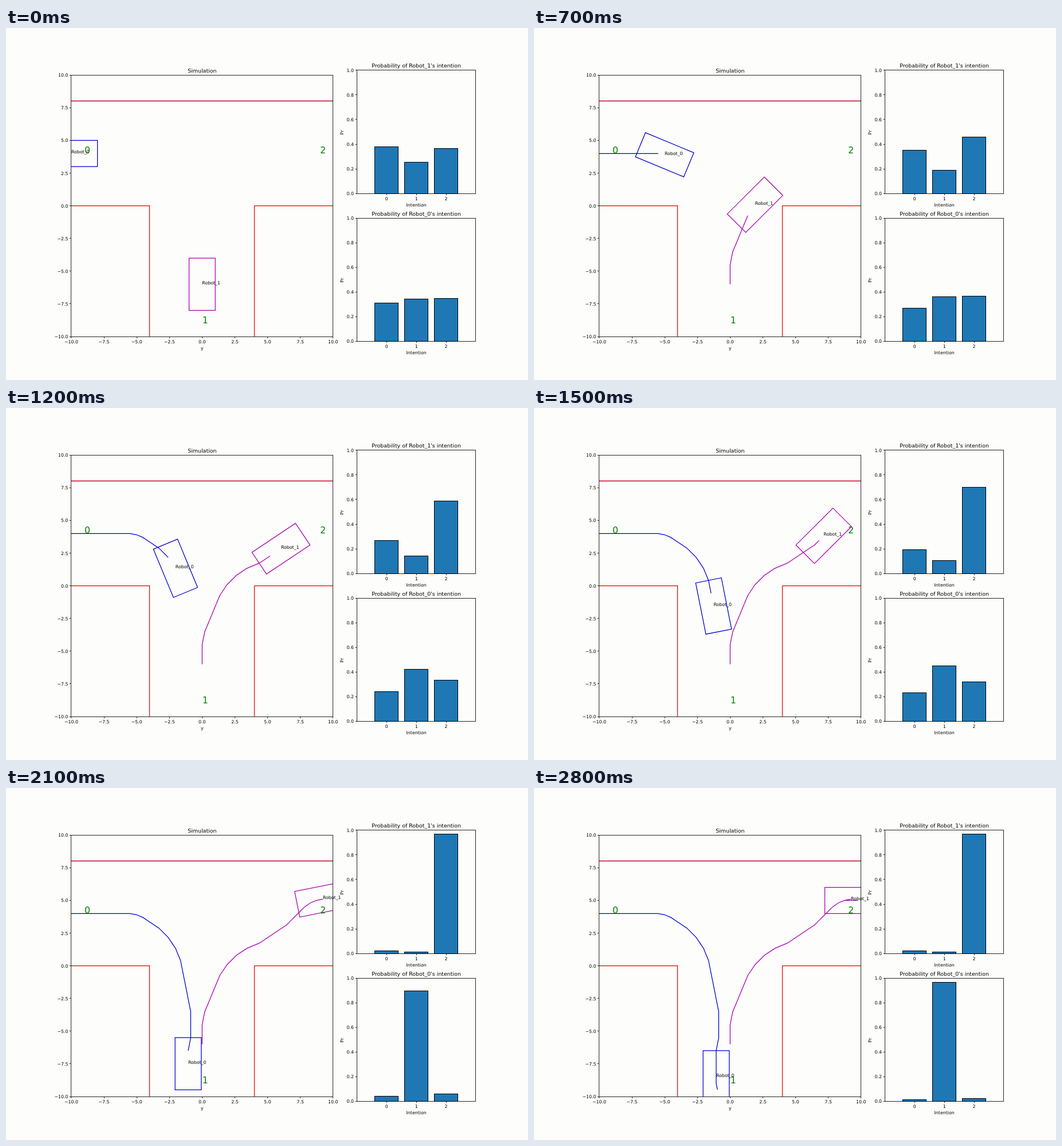
An HTML page that plays this animation: 911x615 px, repeating every 2900 ms.

```html
<!DOCTYPE html>
<html lang="en">
<head>
<meta charset="utf-8">
<title>Simulation</title>
<style>
  html, body { margin: 0; width: 100%; height: 100%; overflow: hidden; background: #fdfdfc; }
  svg { display: block; width: 911px; height: 615px; }
  text { font-family: "DejaVu Sans", sans-serif; font-size: 7.83px; fill: #000; }
  .title { font-size: 9.43px; }
  .goal { font-size: 15.67px; fill: #008000; }
  .axis { fill: none; stroke: #000; stroke-width: .85; }
  .wall, .trail, .body { fill: none; stroke-width: 1.25; }
  .wall { stroke: #ec0000; }
  .top { stroke: #d00028; stroke-width: 1.4; }
  .bar { fill: #1f77b4; stroke: #000; stroke-width: 1; }
</style>
</head>
<body>
<svg id="stage" viewBox="0 0 911 615"></svg>
<script>
const FRAME = 100, COUNT = 29, TURN = Math.PI / 16;
const stage = document.getElementById('stage');

function add(tag, attrs, parent = stage, content) {
  const el = document.createElementNS('http://www.w3.org/2000/svg', tag);
  for (const k in attrs) el.setAttribute(k, attrs[k]);
  if (content !== undefined) el.textContent = content;
  parent.appendChild(el);
  return el;
}
const label = (str, x, y, anchor = 'middle', cls = '') =>
  add('text', { x, y, 'text-anchor': anchor, class: cls }, stage, str);

// Main plot: data range -10..10 on both axes
const UNIT = 22.84, MID_X = 342.35, MID_Y = 310.65;
const px = x => MID_X + x * UNIT;
const py = y => MID_Y - y * UNIT;
const snap = v => Math.floor(v) + .5;
const trace = (pts, fit = v => v.toFixed(2)) => pts.length < 2 ? '' :
  'M' + pts.map(([x, y]) => fit(px(x)) + ' ' + fit(py(y))).join('L');

function box(x, y, w, h, cls) {
  const left = snap(x), top = snap(y);
  return add('rect', { x: left, y: top, width: snap(x + w) - left, height: snap(y + h) - top, class: cls });
}
function axes(x, y, w, h, title, xName) {
  box(x, y, w, h, 'axis');
  label(title, x + w / 2, y - 4.4, 'middle', 'title');
  label(xName, x + w / 2, y + h + 22.9);
}
function xTick(x, base, str) {
  add('path', { d: `M${snap(x)} ${snap(base)}v2.7`, class: 'axis' });
  label(str, x, base + 11.6);
}
function yTick(left, y, str) {
  add('path', { d: `M${snap(left)} ${snap(y)}h-2.7`, class: 'axis' });
  label(str, left - 5.4, y + 3, 'end');
}

// From each listed frame on, "aim" sets the course to turn to (sixteenths of a half turn,
// one per frame) and "pace" the distance per frame.
function drive({ start: [x, y], dir, aim, pace }) {
  const poses = [];
  let goal = dir, speed = 0;
  for (let n = 0; n <= COUNT; n++) {
    goal = aim[n] ?? goal;
    speed = pace[n] ?? speed;
    dir += Math.sign(goal - dir);
    const a = dir * TURN;
    if (n) poses[n - 1].a = a; // the body already faces its next course
    x += speed * Math.cos(a);
    y += speed * Math.sin(a);
    poses.push({ x, y, a });
  }
  return poses;
}
const robots = [
  { name: 'Robot_1', color: '#a800ac', start: [0, -6], dir: 8,
    aim: { 3: 6, 7: 2, 11: 3, 14: 4, 18: 1, 23: 0 },
    pace: { 1: .5, 2: 1, 13: .5, 21: 0, 22: -.5, 23: .5, 25: -.5, 26: 0 } },
  { name: 'Robot_0', color: '#0000cc', start: [-10, 4], dir: 0,
    aim: { 7: -3, 11: -7, 18: -8, 20: -9, 21: -8, 24: -7, 26: -8 },
    pace: { 1: .5, 2: 1, 5: .5, 10: 1, 23: .5, 25: -.5, 27: 0 } }
];

function outline({ x, y, a }) {
  const c = Math.cos(a), s = Math.sin(a);
  return trace([[2, 1], [2, -1], [-2, -1], [-2, 1]]
    .map(([u, v]) => [x + u * c - v * s, y + u * s + v * c])) + 'Z';
}

const clip = add('clipPath', { id: 'field' }, add('defs', {}));
add('rect', { x: px(-10), y: py(10), width: 20 * UNIT, height: 20 * UNIT }, clip);
const field = add('g', { 'clip-path': 'url(#field)' });
const wall = (pts, cls = '') => add('path', { class: 'wall ' + cls, d: trace(pts, snap) }, field);
wall([[-10, 8], [10, 8]], 'top');
for (const side of [-1, 1]) wall([[side * 10, 0], [side * 4, 0], [side * 4, -10]]);
for (const r of robots) {
  r.poses = drive(r);
  r.trail = add('path', { class: 'trail', stroke: r.color }, field);
  r.body = add('path', { class: 'body', stroke: r.color }, field);
}

axes(px(-10), py(10), 20 * UNIT, 20 * UNIT, 'Simulation', 'y');
for (let v = -10; v <= 10; v += 2.5) {
  const str = v.toFixed(1).replace('-', '\u2212');
  xTick(px(v), py(-10), str);
  yTick(px(-10), py(v), str);
}
[[-9, 4], [0, -9], [9, 4]].forEach(([x, y], i) => label(i, px(x) + .3, py(y) + .2, 'start', 'goal'));
for (const r of robots) r.tag = label(r.name, 0, 0, 'start');

// Bar charts: "lead" is the chance of the true intention at the key frames,
// the other two bars split what is left.
const LEFT = 612.3, WIDE = 207.66, HIGH = 215.25, COL = WIDE / 4;
const KEYS = [0, 3, 7, 10, 15, 21, 28];
const charts = [
  { top: 73.85, name: 'Robot_1', order: [2, 1, 0], split: .35,
    lead: [.367, .385, .459, .513, .7, .967, .97] },
  { top: 332.1, name: 'Robot_0', order: [1, 0, 2], split: .42,
    lead: [.342, .337, .363, .401, .452, .898, .964] }
];
for (const c of charts) {
  const base = c.top + HIGH;
  c.bars = [0, 1, 2].map(i => box(LEFT + COL * (i + .6), c.top, COL * .8, HIGH, 'bar'));
  axes(LEFT, c.top, WIDE, HIGH, `Probability of ${c.name}'s intention`, 'Intention');
  for (let i = 0; i < 3; i++) xTick(LEFT + COL * (i + 1), base, i);
  for (let i = 0; i <= 5; i++) yTick(LEFT, base - HIGH * i / 5, (i / 5).toFixed(1));
  label('Pr', 0, 0).setAttribute('transform', `translate(589.4 ${c.top + HIGH / 2 + 1}) rotate(-90)`);
}

function chances({ lead, split }, n) {
  const k = Math.max(1, KEYS.findIndex(key => key >= n));
  const t = (n - KEYS[k - 1]) / (KEYS[k] - KEYS[k - 1]);
  const best = lead[k - 1] + (lead[k] - lead[k - 1]) * t;
  const part = (1 - best) * (split + .05 * Math.exp(-n / 2));
  return [best, part, 1 - best - part];
}

function draw(n) {
  for (const r of robots) {
    const pose = r.poses[n];
    r.trail.setAttribute('d', trace(r.poses.slice(0, n).map(p => [p.x, p.y])));
    r.body.setAttribute('d', outline(pose));
    r.tag.setAttribute('x', px(pose.x));
    r.tag.setAttribute('y', py(pose.y));
  }
  for (const c of charts) {
    const base = c.top + HIGH;
    chances(c, n).forEach((p, i) => {
      const bar = c.bars[c.order[i]], y = snap(base - HIGH * p);
      bar.setAttribute('y', y);
      bar.setAttribute('height', snap(base) - y);
    });
  }
}

const begin = performance.now();
let shown = 0;
function tick() {
  const n = Math.floor((performance.now() - begin) / FRAME) % COUNT;
  if (n !== shown) draw(shown = n);
  requestAnimationFrame(tick);
}
draw(0);
requestAnimationFrame(tick);
</script>
</body>
</html>
```
